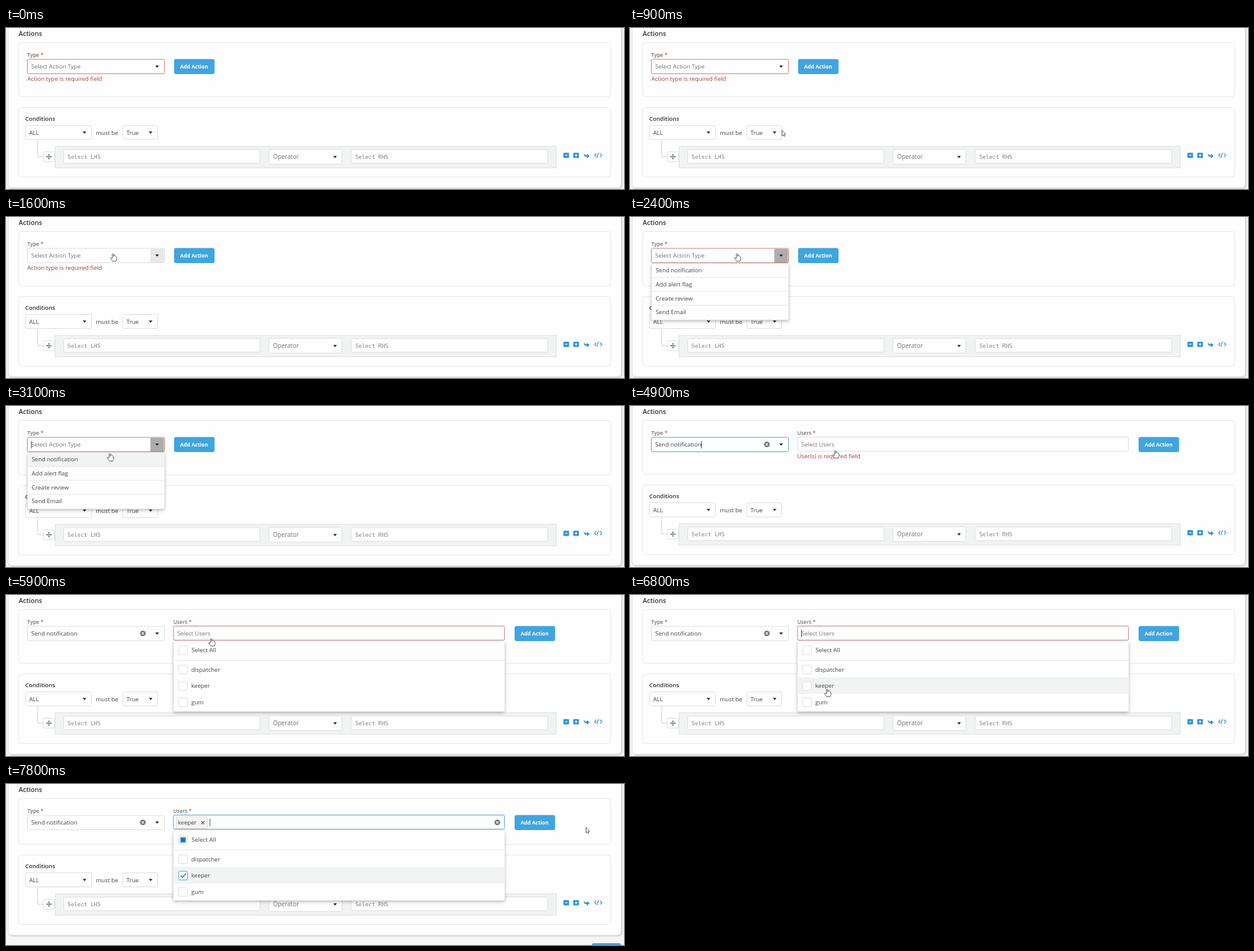
An HTML page that plays this animation: 1000x262 px, repeating every 8000 ms.

```html
<!DOCTYPE html>
<html lang="en">
<head>
<meta charset="utf-8">
<title>Rule actions form</title>
<style>
html, body { margin: 0; width: 100%; height: 100%; overflow: hidden; background: #f5f5f5; }
svg { display: block; font: 9.5px "Open Sans", "Noto Sans", sans-serif; fill: #444; }
.box { fill: #fefefe; stroke: #dedede; }
.panel { fill: none; stroke: #e7e7e7; }
.semi { font-weight: 600; fill: #333; }
.label { font-size: 8.4px; font-weight: 600; fill: #707070; }
.star { fill: #c4574d; }
.error { fill: #a0403a; }
.hint { fill: #757575; }
.mono { font: 8.9px "DejaVu Sans Mono", monospace; fill: #858585; }
.blue { fill: #41a4de; }
.icon { fill: #3193d2; }
.line { fill: none; stroke: #d5d5d5; }
.menu { filter: drop-shadow(0 2px 2.5px #0004); }
.menu .sep { stroke: #e8e8e8; }
.hover { fill: #f2f3f3; }
.caret { stroke: #333; stroke-width: .9; }
.add { font-size: 8.3px; font-weight: 700; fill: #fff; }
</style>
</head>
<body>
<svg width="1000" height="262" viewBox="0 0 1000 262">
<defs>
  <path id="arrow" d="M-3-1.6H3L0 1.9Z" fill="#222"/>
  <g id="clear"><circle r="4.6" fill="#777"/><path d="M-1.7-1.7 1.7 1.7M1.7-1.7-1.7 1.7" stroke="#fff" stroke-width="1.2"/></g>
  <rect id="check" x="279.5" y="-7" width="14" height="14" rx="1.5" fill="#fff" stroke="#dcdcdc"/>
</defs>

<g id="body">
  <rect x="3.5" y="-40" width="992" height="300" rx="6" fill="#fefefe" stroke="#dfdfdf" style="filter:drop-shadow(1px 1px 1px #0003)"/>
  <rect class="blue" x="948" y="273" width="47" height="24" rx="3"/>
  <rect class="panel" x="20.5" y="129.5" width="958" height="113" rx="4"/>
  <text class="semi" x="31" y="150.5" font-size="9.4">Conditions</text>
  <rect class="box" x="31.5" y="158.5" width="107" height="23" rx="2"/>
  <text x="37.5" y="173.6">ALL</text><use href="#arrow" x="127" y="170"/>
  <text x="145.5" y="173.6">must be</text>
  <rect class="box" x="189" y="158.5" width="56.5" height="23" rx="2"/>
  <text x="195" y="173.6">True</text><use href="#arrow" x="234" y="170"/>
  <path class="line" d="M51.5 182V209.5H60"/>
  <rect x="79.5" y="192.5" width="811" height="35" fill="#f1f3f3" stroke="#e0e2e2"/>
  <rect class="box" x="60.5" y="201.5" width="18" height="16" rx="2"/>
  <g transform="translate(69.5 209.5)" fill="#666">
    <path d="M-3 0H3M0-3V3" stroke="#666"/>
    <path d="M-4.5 0-2.5-1.7V1.7ZM4.5 0 2.5-1.7V1.7ZM0-4.5-1.7-2.5H1.7ZM0 4.5-1.7 2.5H1.7Z"/>
  </g>
  <rect class="box" x="93.5" y="198" width="317.5" height="22" rx="2"/>
  <text class="mono" x="99.6" y="213.4">Select LHS</text>
  <rect class="box" x="425.5" y="197.5" width="118" height="24" rx="2"/>
  <text class="hint" x="432" y="213" font-size="9.9">Operator</text><use href="#arrow" x="532.5" y="209.8"/>
  <rect class="box" x="558.5" y="198" width="318" height="22" rx="2"/>
  <text class="mono" x="565.2" y="213.4">Select RHS</text>
  <g class="icon" transform="translate(0 207)">
    <rect x="902" y="-4" width="9" height="8.5" rx="1"/>
    <rect x="918" y="-4" width="9" height="8.5" rx="1"/>
    <path d="M904.5.2H908.5M920.3.2H924.7M922.5-2V2.4" stroke="#fff" stroke-width="1.2"/>
    <path d="M940-2.3 944.5 1.3 940 5V2.6C936 2.8 934.6.6 935-3 936 -.6 937.5 0 940 0Z"/>
    <path d="M955-3 952.5 0 955 3M961.5-3 964 0 961.5 3M959.5-4 957-.2 956.8 4" fill="none" stroke="#3193d2" stroke-width="1.2"/>
  </g>
</g>

<text class="semi" x="20.6" y="12.6" font-size="10.6">Actions</text>
<rect id="panel" class="panel" x="20.5" y="23.5" width="958" rx="4"/>
<text class="label" x="34.6" y="47.4">Type <tspan class="star">*</tspan></text>
<rect id="type" class="box" x="34.5" y="51" width="222" height="23.5" rx="2"/>
<rect id="drop" x="233.5" y="52" width="22" height="22"/>
<use href="#arrow" x="244.5" y="62.5"/>
<text id="typeHint" class="hint" x="40.8" y="65.7">Select Action Type</text>
<text id="typeError" class="error" x="34.4" y="85.6">Action type is required field</text>
<g id="typeValue">
  <text x="40.8" y="65.9">Send notification</text>
  <use href="#clear" x="221.5" y="62.5"/>
</g>
<path id="typeCaret" class="caret" d="M0 57V69"/>

<g id="users">
  <text class="label" x="270.8" y="47.4">Users <tspan class="star">*</tspan></text>
  <rect id="usersBox" class="box" x="271" y="50.5" width="535.5" height="23" rx="2"/>
  <text id="usersHint" class="hint" x="277" y="65.6">Select Users</text>
  <text id="usersError" class="error" x="270.6" y="84.6">User(s) is required field</text>
  <g id="chip">
    <rect x="275.5" y="53" width="50.5" height="19.5" rx="2" fill="#f3f3f3" stroke="#dcdcdc"/>
    <text x="278" y="66">keeper</text>
    <path d="M316 60.5 321 65.5M321 60.5 316 65.5" stroke="#777" stroke-width="1.7"/>
    <use href="#clear" x="795" y="62.5"/>
  </g>
  <path id="usersCaret" class="caret" d="M0 56.5V68.5"/>
</g>

<g id="add">
  <rect class="blue" x="272" y="50.5" width="65.5" height="24.5" rx="3"/>
  <text class="add" x="281.8" y="65.8">Add Action</text>
</g>

<g id="typeMenu" class="menu">
  <rect x="35" y="75.5" width="221.5" height="92" rx="2" fill="#fefefe" stroke="#e2e2e2" stroke-width=".6"/>
  <rect id="typeHover" class="hover" x="35.5" y="76" width="220.5" height="22"/>
  <path class="sep" d="M35 98.5H256M35 121H256M35 143.5H256"/>
  <text x="41.6" y="90.3">Send notification</text>
  <text x="41.6" y="113">Add alert flag</text>
  <text x="41.6" y="135.7">Create review</text>
  <text x="41.6" y="158.4">Send Email</text>
</g>

<g id="usersMenu" class="menu">
  <rect x="271" y="75.5" width="536" height="114" rx="2" fill="#fefefe" stroke="#e2e2e2" stroke-width=".6"/>
  <g id="usersList">
    <rect id="usersHover" class="hover" x="271.5" width="535"/>
    <path class="sep" d="M271 106.5H807"/>
    <use href="#check" y="90"/><text x="300.2" y="93.4">Select All</text>
    <use href="#check" y="121.3"/><text x="299.8" y="124.8">dispatcher</text>
    <use href="#check" y="148"/><text x="299.8" y="151.2">keeper</text>
    <use href="#check" y="174.6"/><text x="299.8" y="178">gum</text>
    <g id="picked">
      <rect class="icon" x="282" y="85.5" width="9" height="9" rx="1"/>
      <rect x="284" y="87.5" width="5" height="5" fill="#1d6ba3"/>
      <rect x="279.5" y="141" width="14" height="14" rx="1.5" fill="#fff" stroke="#5b9fc9"/>
      <path d="M282.5 148 285.5 151.3 291 145" fill="none" stroke="#2a80bb" stroke-width="1.5"/>
    </g>
  </g>
</g>

<g id="cursor" stroke="#333" stroke-width=".8" fill="#fff" stroke-linejoin="round">
  <path id="hand" d="M-1 .8C-1-.4 1-.4 1 .8V4.2C2-.2+4 2.8 4 2.8 4.6 3.9 5 5.1 5 5.1 6.2 4.6 6.4 6 6.3 7.5 6.3 9.8 5.3 10.3 5 12H-.8C-1 10.4-3.6 8.8-4.2 7-4 5.8-2.4 6.2-1 7.6Z"/>
  <path id="pointer" d="M0 0V9L2 7.2 3.4 10 4.7 9.4 3.5 6.6H6Z"/>
</g>
</svg>

<script>
const LOOP = 8000;
const OPEN_TYPE = 1800, CHOOSE = 3700, OPEN_USERS = 5400, PICK = 6900;
const RED = '#c88078', BLUE = '#5c9fc4', GREY = '#dedede';

// Pointer tip: time, x, y
const path = [
  [600, 310, 262], [1000, 225, 135], [1400, 225, 135], [1600, 173, 60],
  [2900, 173, 60], [3100, 168, 77.5], [3500, 165, 81], [4600, 165, 81],
  [4900, 332, 73], [5000, 332, 71], [5900, 332, 71], [6700, 319, 153.5],
  [7400, 319, 153.5], [7800, 938.5, 70.5]
];
const rows = [76, 106.5, 134, 161, 188.5];

const $ = id => document.getElementById(id);
const set = (id, name, value) => $(id).setAttribute(name, value);
const show = (id, on) => set(id, 'visibility', on ? 'inherit' : 'hidden');
const shift = (id, x, y) => set(id, 'transform', `translate(${x} ${y})`);
const clamp = v => Math.max(0, Math.min(1, v));
const between = (t, a, b) => t >= a && t < b;
const blink = (t, start) => (t - start) % 1000 < 500;

function tip(t) {
  const i = path.findIndex(p => p[0] > t);
  if (i < 0) return path.at(-1).slice(1);
  if (i === 0) return path[0].slice(1);
  const [t0, x0, y0] = path[i - 1], [t1, x1, y1] = path[i];
  const k = (t - t0) / (t1 - t0);
  return [x0 + (x1 - x0) * k, y0 + (y1 - y0) * k];
}

function draw(t) {
  const [x, y] = tip(t);
  const chosen = t >= CHOOSE, picked = t >= PICK;
  const typeOpen = between(t, OPEN_TYPE, CHOOSE);
  const usersOpen = t >= OPEN_USERS;
  const overType = between(t, 1500, OPEN_TYPE);
  const overUsers = between(t, 4800, OPEN_USERS);

  const offset = picked ? -14 : chosen ? -1 : 0;
  shift('body', 0, offset);
  set('panel', 'height', 88.5 + offset);
  shift('add', chosen ? 551 : 0, 0);

  const typeFocus = between(t, CHOOSE, OPEN_USERS);
  $('type').style.stroke = typeFocus ? BLUE : chosen || overType ? GREY : RED;
  show('drop', overType || typeOpen);
  set('drop', 'fill', typeOpen ? '#adadad' : '#e8e8e8');
  show('typeHint', !chosen);
  show('typeError', !chosen);
  show('typeValue', chosen);
  show('typeCaret', typeOpen ? t >= 1900 && blink(t, 1900) : typeFocus && blink(t, CHOOSE));
  shift('typeCaret', chosen ? 115.5 : 41, 0);
  const fade = chosen ? 1 - (t - CHOOSE) / 300 : (t - OPEN_TYPE) / 200;
  set('typeMenu', 'opacity', clamp(fade));
  show('typeHover', y > 76);

  show('users', chosen);
  $('usersBox').style.stroke = picked ? BLUE : overUsers ? GREY : RED;
  show('usersHint', !picked);
  show('usersError', !picked);
  show('chip', picked);
  show('usersCaret', usersOpen && blink(t, OPEN_USERS));
  shift('usersCaret', picked ? 330 : 277.5, 0);
  show('usersMenu', usersOpen);
  show('picked', picked);
  shift('usersList', 0, picked ? 1 : 0);

  // The highlighted row stays after the pointer leaves the list
  const hoverY = tip(Math.min(t, 7400))[1];
  const row = rows.findLastIndex(top => hoverY >= top);
  show('usersHover', row >= 0 && row < 4);
  if (row >= 0 && row < 4) {
    set('usersHover', 'y', rows[row]);
    set('usersHover', 'height', rows[row + 1] - rows[row]);
  }

  const hand = between(t, 1500, 4600) || between(t, 4800, 7450);
  show('cursor', t >= 600);
  show('hand', hand);
  show('pointer', !hand);
  shift('cursor', x, y);
}

function tick() {
  draw(performance.now() % LOOP);
  requestAnimationFrame(tick);
}
tick();
</script>
</body>
</html>
```
